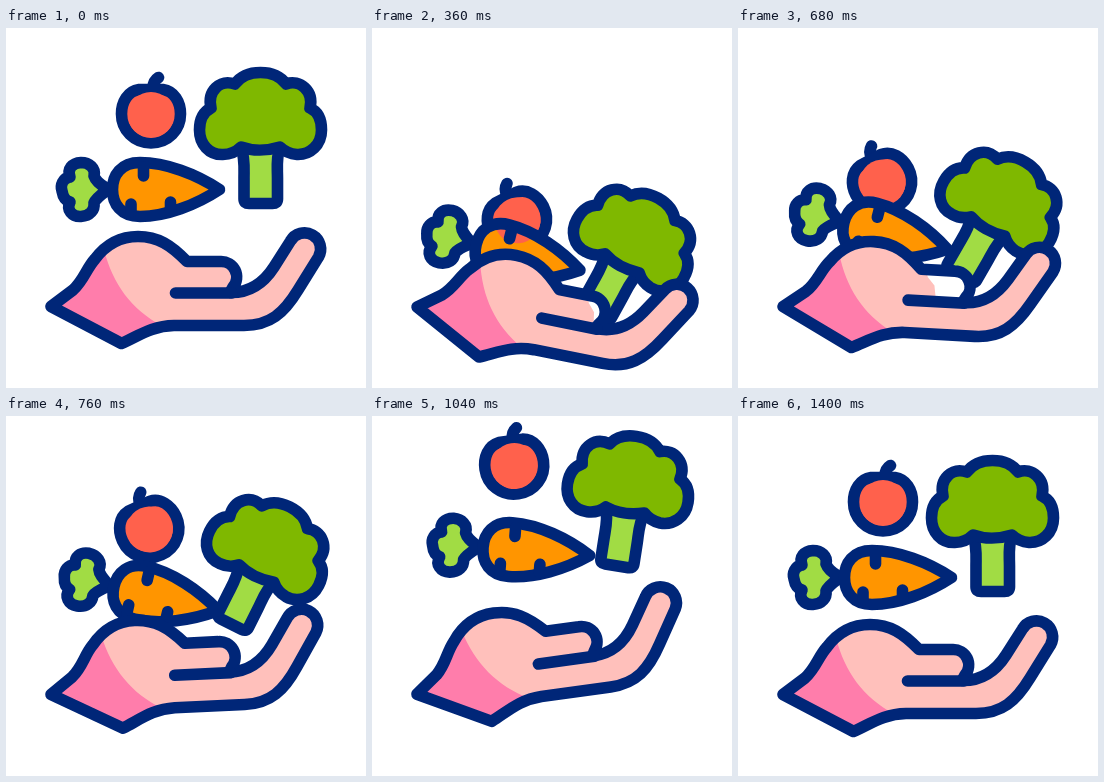
An HTML page that plays this animation: 360x360 px, repeating every 2000 ms.

```html
<!DOCTYPE html>
<html lang="en">
<head>
<meta charset="utf-8">
<title>Vegetables tossed by a hand</title>
<style>
html, body { margin: 0; width: 100%; height: 100%; overflow: hidden; background: #fff; }
svg { display: block; width: 100vw; height: 100vh; }
.line { fill: none; stroke: #002678; stroke-width: 11.6; stroke-linecap: round; stroke-linejoin: round; }
</style>
</head>
<body>
<svg viewBox="0 0 360 360">
  <defs>
    <path id="palm" d="M45 278.500 L67 262 C78 252 80 241 89 231 C101 215 115 208.500 132 208.500 C152 208.500 165 217 181 233.500
      H214.500 A15.500 15.500 0 0 1 227 259 L224 264.500 C246 265 259 253 268 239 L284.500 213 A16 16 0 0 1 312.500 229
      L292 262 C278 285 264 297.500 238 297.500 H168 C146 298 134 307 115.500 315.500 Z"/>
    <path id="carrot" d="M213.500 161.500 C190 146 160 134.500 134 134.500 C115 134.500 106.500 147 106.500 161.500
      C106.500 176 115 188.500 134 188.500 C160 188.500 190 177 213.500 161.500 Z"/>
    <path id="stem" d="M235 119 C239 130 238 140 238 150 V171 Q238 175.500 243 175.500 H266.500 Q271.500 175.500 271.500 171 V150 C271.500 140 270 130 274 119"/>
    <clipPath id="palmClip"><use href="#palm"/></clipPath>
    <clipPath id="thumbClip"><rect x="150" y="233" width="80" height="32" rx="16"/></clipPath>
  </defs>

  <g class="broccoli">
    <use href="#stem" class="line" style="fill:#a1dc44"/>
    <path class="line" style="fill:#7fb800" d="M254.500 44.500 C266 44.500 275 49 280 56 C294 51 308 63 304 80 C313 84 315.500 93 315.500 102
      C315.500 117 304 127 291 126.500 C284 126 278 123 274 119 C261 123 246 123 235 119 C230 124 224 126.500 217 126.500
      C203 127 193.500 116 193.500 102 C193.500 92 197 84 205 80 C201 63 214 51 229 56 C234 49 243 44.500 254.500 44.500 Z"/>
  </g>

  <g class="tomato">
    <path class="line" d="M147 60 Q147 53 152.500 49.500"/>
    <path class="line" style="fill:#ff614c" d="M133 61.500 H157 C168 63 174.500 74 174.500 86 C174.500 102 162 115 145 115
      C128 115 115.500 102 115.500 86 C115.500 74 122 63 133 61.500 Z"/>
  </g>
  <g class="carrot">
    <path class="line" style="fill:#a1dc44" d="M102 161.500 C96 157 90 154 88 148 C90 140 83 134.500 75 134.500 C66 135 61 141 64 149
      C57 150 54 157 56 163 C57 169 60 173 64 174 C60 182 66 189 75 188.500 C84 188 89 182 88 175 C90 170 96 166 102 161.500 Z"/>
    <use href="#carrot" fill="#ff9500"/>
  </g>
  <g class="tomato"><circle cx="145" cy="87" r="23" fill="#ff614c"/></g>
  <g class="carrot">
    <use href="#carrot" class="line"/>
    <path class="line" d="M137.500 139 V148 M125 176 V184 M164.500 174 V182"/>
  </g>

  <g class="hand">
    <use href="#palm" fill="#ffc0bb"/>
    <path clip-path="url(#palmClip)" fill="#ff7dab" d="M30 200 H91 L98 222 C107 256 125 281 156 298 V330 H30 Z"/>
    <g clip-path="url(#thumbClip)"><path id="gap" fill="#fff" d="M184 230 L188 241 L195 249 L198 268 H260 V230 Z"/></g>
    <use href="#palm" class="line"/>
    <path class="line" d="M169.500 265 H226"/>
  </g>
</svg>
<script>
const LOOP = 2000, STEP = 40;
const layers = name => document.querySelectorAll("." + name);
const gap = document.getElementById("gap");

// Pivot, then [lowest, highest] shift on each axis, and the largest lean
const foods = [
  { nodes: layers("tomato"), pivot: [145, 86], x: [0, -3], y: [114, -40], lean: -30 },
  { nodes: layers("carrot"), pivot: [75, 161.5], x: [-1.5, 5], y: [51, -35], lean: 15.5 },
  { nodes: layers("broccoli"), pivot: [254.5, 110], x: [0, 0], y: [127, -27], lean: 32 }
];
const hand = layers("hand");

// Half-cosine ease from 0 at time a to 1 at time b
function ease(t, a, b) {
  const u = Math.min(1, Math.max(0, (t - a) / (b - a)));
  return (1 - Math.cos(Math.PI * u)) / 2;
}

// Rest, sink to low, swing up to high, return to rest
function toss(t, [low, high], sunk, lift, top, settle) {
  return low * ease(t, 80, sunk) + (high - low) * ease(t, lift, top) - high * ease(t, settle, 1360);
}

function place(nodes, x, y, angle, pivot) {
  nodes.forEach(n => n.setAttribute("transform", `translate(${x} ${y}) rotate(${angle} ${pivot})`));
}

function draw(ms) {
  const t = Math.floor((ms % LOOP) / STEP) * STEP;
  const shift = range => toss(t, range, 420, 510, 970, 970);
  const lean = ease(t, 80, 430) - ease(t, 560, 1300);
  for (const f of foods) place(f.nodes, shift(f.x), shift(f.y), f.lean * lean, f.pivot);
  place(hand, 0, 0, toss(t, [13.5, -8.6], 460, 460, 920, 960), [43, 279]);

  gap.setAttribute("visibility", t >= 340 && t <= 720 ? "visible" : "hidden");
  gap.setAttribute("transform", `translate(${Math.max(0, (680 - t) / 13)} 0)`);
}

const start = performance.now();
function tick() {
  draw(performance.now() - start);
  requestAnimationFrame(tick);
}
tick();
</script>
</body>
</html>
```
